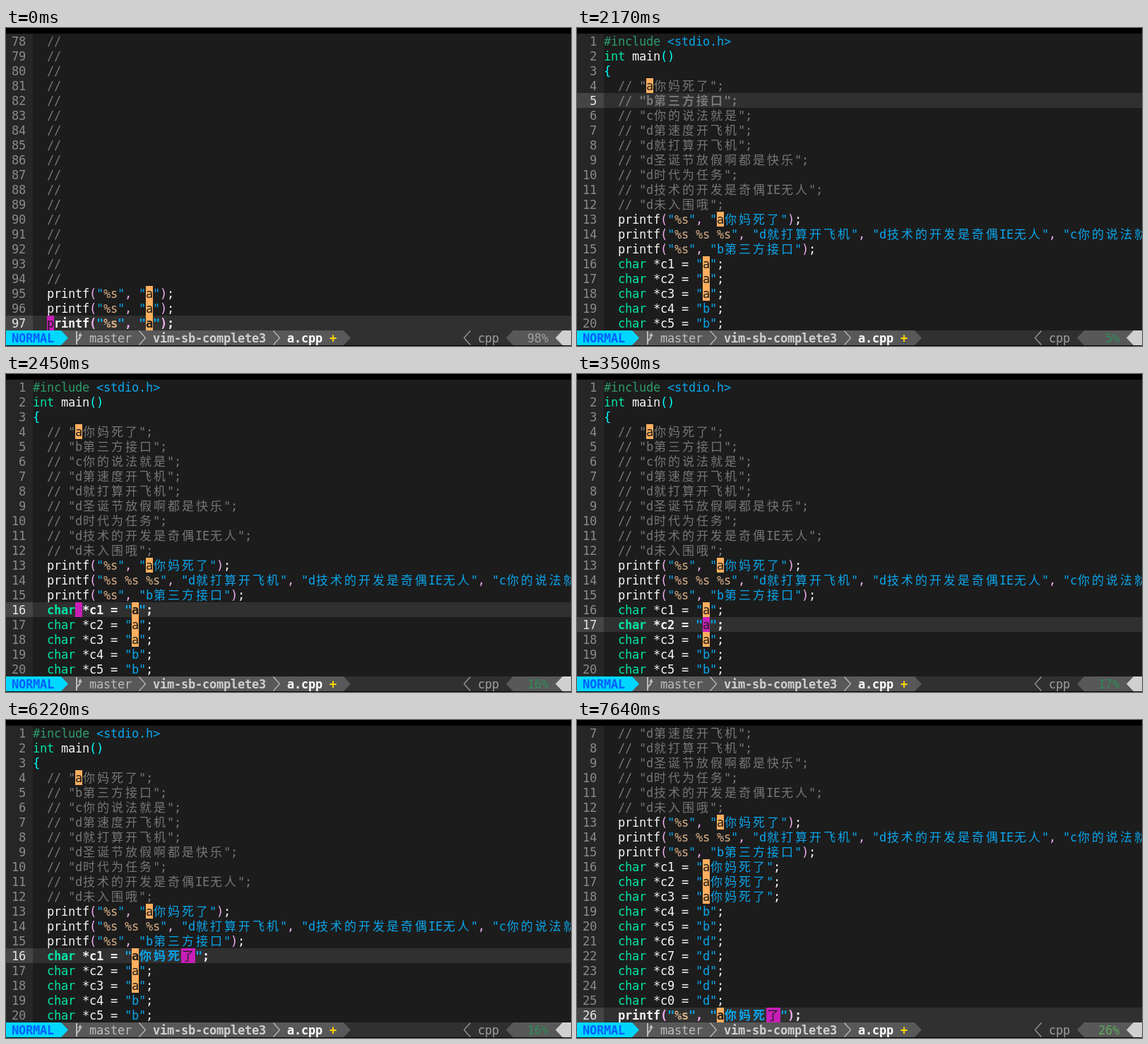
An HTML page with a canvas for the animation above (8000 ms loop, 800 px wide and 450 px high).

```html
<!DOCTYPE html>
<html lang="en">
<head>
<meta charset="utf-8">
<title>Editor session</title>
<style>
html, body { margin: 0; width: 100%; height: 100%; overflow: hidden; background: #000; }
canvas { display: block; }
</style>
</head>
<body>
<canvas id="stage" width="800" height="450"></canvas>
<script>
const ctx = document.getElementById('stage').getContext('2d');
const LOOP = 8000, ROWS = 20, TOTAL = 98, CW = 10, RH = 21, TOP = 8, LEFT = 38, BASE = 17;
const STATUS_Y = TOP + ROWS * RH;
const MONO = '17px "DejaVu Sans Mono", monospace';
const CJK = '17px "Noto Sans CJK SC", "Noto Sans CJK", sans-serif';

const C = {
  bg: '#1c1c1c', gutter: '#262626', number: '#8a8a8a', line: '#303030', lineNo: '#444444',
  text: '#f4f4f4', comment: '#767676', string: '#0aa5ea', format: '#d7af87', paren: '#f0b0f0',
  outer: '#00ffff', type: '#00e5a5', include: '#2e9b6b', match: '#ffaf5f', cursor: '#c71fb7'
};

const MODES = {
  NORMAL: { fg: '#005fff', bg: '#00d7ff', mid: '#585858', bar: '#303030', end: '#d0d0d0', type: '#9e9e9e' },
  INSERT: { fg: '#005f5f', bg: '#ffffff', mid: '#0087af', bar: '#005f87', end: '#87d7ff', type: '#87d7ff' }
};

// ---- Buffer ----
const WORD = 'a你妈死了';
const head = ['#include <stdio.h>', 'int main()', '{'];
const notes = [WORD, 'b第三方接口', 'c你的说法就是', 'd第速度开飞机', 'd就打算开飞机',
  'd圣诞节放假啊都是快乐', 'd时代为任务', 'd技术的开发是奇偶IE无人', 'd未入围哦'];
const print = s => `  printf("%s", "${s}");`;

function lineText(n, edits) {
  const word = edits[n] ?? 'a';
  if (n <= 3) return head[n - 1];
  if (n <= 12) return `  // "${notes[n - 4]}";`;
  if (n === 13) return print(WORD);
  if (n === 14) return `  printf("%s %s %s", "${notes[4]}", "${notes[7]}", "${notes[2]}");`;
  if (n === 15) return print(notes[1]);
  if (n <= 25) return `  char *c${(n - 15) % 10} = "${n <= 18 ? word : n <= 20 ? 'b' : 'd'}";`;
  if (n === 26 || (n >= 95 && n <= 97)) return print(word);
  return n === TOTAL ? '}' : '  //';
}

// Split a line into [text, colour] pieces.
function tokens(s) {
  if (s.startsWith('  //')) return [[s, C.comment]];
  if (s[0] === '#') return [['#include ', C.include], [s.slice(9), C.string]];
  const parens = s.startsWith('int') ? C.outer : C.paren;
  const out = [];
  for (const t of s.match(/"|%s|\b(?:char|int)\b|[(),{}]|[^"%(),{}\s]+|\s+/g)) {
    const quoted = out.filter(p => p[0] === '"').length % 2 === 1;
    let color = C.text;
    if (t === '%s') color = C.format;
    else if (t === '"' || quoted) color = C.string;
    else if (/^(char|int)$/.test(t)) color = C.type;
    else if (/[{}]/.test(t)) color = C.outer;
    else if (/^[(),]$/.test(t)) color = parens;
    out.push([t, color]);
  }
  return out;
}

// ---- Timeline: changes are merged into the running state ----
const steps = [
  [0, { top: 78, row: 97, x: 2, mode: 'NORMAL', edits: {}, menu: false }],
  [380, { row: 96, x: null }], [430, { x: 16 }],
  [910, { row: 97 }],
  [1200, { top: 1, row: 4, x: null }], [1250, { x: 6 }],
  [1680, { row: 5, x: null }], [1720, { x: 6 }],
  [2170, { x: null }]
];
for (let k = 1; k <= 8; k++) steps.push([2170 + 40 * k, { row: 5 + Math.round(1.6 * k), x: 6 }]);
steps.push(
  [3000, { row: 17, x: null }], [3050, { x: 6 }], [3500, { x: 14 }],
  [4020, { row: 16, x: null }], [4070, { x: 14 }],
  [4950, { x: null }],
  [4990, { x: 14, mode: 'INSERT', edits: { 16: '' } }],
  [5200, { x: 15, edits: {} }],
  [5640, { x: null, edits: { 16: WORD }, menu: true }], [5690, { x: 23 }],
  [6120, { x: null, menu: false }], [6170, { mode: 'NORMAL' }], [6220, { x: 21 }],
  [6940, { row: 17, x: 14 }], [7030, { x: 21, edits: { 16: WORD, 17: WORD } }],
  [7120, { row: 18, x: 14 }], [7210, { x: 21, edits: { 16: WORD, 17: WORD, 18: WORD } }],
  [7530, { top: 7, row: 26, x: 16 }],
  [7640, { x: 23, edits: { 16: WORD, 17: WORD, 18: WORD, 26: WORD } }]
);

function stateAt(t) {
  const s = {};
  for (const [at, change] of steps) if (at <= t) Object.assign(s, change);
  return s;
}

// ---- Drawing ----
function box(x, y, w, h, color) {
  ctx.fillStyle = color;
  ctx.fillRect(x, y, w, h);
}

const isWide = ch => ch >= '\u2e80';

function glyph(ch, x, y, color, bold) {
  const wide = isWide(ch);
  ctx.font = (bold ? 'bold ' : '') + (wide ? CJK : MONO);
  ctx.fillStyle = color;
  ctx.fillText(ch, x + (wide ? 1 : 0), y + BASE);
}

function put(s, x, y, color, bold) {
  for (const ch of s) {
    if (ch !== ' ') glyph(ch, x, y, color, bold);
    x += isWide(ch) ? 2 * CW : CW;
  }
}

function drawLine(n, y, s) {
  const current = n === s.row;
  if (current) box(0, y, 800, RH, C.line);
  box(0, y, LEFT, RH, current ? C.lineNo : C.gutter);
  put(String(n).padStart(2), 8, y, current ? '#e4e4e4' : C.number);

  let col = 0, prev = '';
  for (const [text, color] of tokens(lineText(n, s.edits))) {
    for (const ch of text) {
      const cells = isWide(ch) ? 2 : 1, x = LEFT + col * CW;
      const hit = ch === 'a' && prev === '"';
      const under = current && s.x === col;
      if (hit || under) box(x, y, cells * CW, RH, under ? C.cursor : C.match);
      if (ch !== ' ') glyph(ch, x, y, hit || under ? C.bg : color, current && !under);
      col += cells;
      prev = ch;
    }
  }
}

// Filled separator; dir 1 points right, -1 points left.
function wedge(x, dir, color) {
  const base = dir > 0 ? x : x + CW, tip = dir > 0 ? x + CW : x;
  ctx.fillStyle = color;
  ctx.beginPath();
  ctx.moveTo(base, STATUS_Y);
  ctx.lineTo(tip, STATUS_Y + RH / 2);
  ctx.lineTo(base, STATUS_Y + RH);
  ctx.fill();
}

function chevron(x, dir, color) {
  const base = dir > 0 ? x + .5 : x + CW - .5, tip = dir > 0 ? x + CW - .5 : x + .5;
  ctx.strokeStyle = color;
  ctx.lineWidth = 1.2;
  ctx.beginPath();
  ctx.moveTo(base, STATUS_Y + .5);
  ctx.lineTo(tip, STATUS_Y + RH / 2);
  ctx.lineTo(base, STATUS_Y + RH - .5);
  ctx.stroke();
}

function branch(x, y, color) {
  ctx.strokeStyle = ctx.fillStyle = color;
  ctx.lineWidth = 2;
  ctx.beginPath();
  ctx.moveTo(x + 2, y + 1);
  ctx.lineTo(x + 2, y + 20);
  ctx.moveTo(x + 2, y + 17);
  ctx.bezierCurveTo(x + 2, y + 12, x + 7, y + 14, x + 7, y + 7);
  ctx.stroke();
  ctx.beginPath();
  ctx.moveTo(x + 4, y + 8);
  ctx.lineTo(x + 7, y + 3);
  ctx.lineTo(x + 10, y + 8);
  ctx.fill();
}

function drawStatus(s) {
  const m = MODES[s.mode], y = STATUS_Y;
  box(0, y, 800, RH, m.bar);
  box(0, y, 478, RH, m.mid);
  wedge(478, 1, m.mid);
  box(0, y, 78, RH, m.bg);
  wedge(78, 1, m.bg);
  put(s.mode, 8, y, m.fg, true);
  branch(98, y, '#bcbcbc');
  put('master', 118, y, '#bcbcbc');
  chevron(188, 1, '#bcbcbc');
  put('vim-sb-complete3', 208, y, '#d0d0d0', true);
  chevron(378, 1, '#bcbcbc');
  put('a.cpp', 398, y, '#ffffff', true);
  put('+', 458, y, '#ffd700', true);

  chevron(648, -1, m.type);
  put('cpp', 668, y, m.type);
  box(718, y, 60, RH, m.mid);
  wedge(708, -1, m.mid);
  box(778, y, 10, RH, m.mid);
  const pct = Math.floor(s.row * 100 / TOTAL);
  const pctColor = pct < 20 ? '#2e8b57' : pct < 50 ? '#5fa85f' : '#9e9e9e';
  put(`${pct}%`.padStart(4), 728, y, pctColor);
  box(788, y, 12, RH, m.end);
  wedge(778, -1, m.end);
}

function drawMenu(y) {
  [WORD, 'a'].forEach((word, i) => {
    box(168, y + i * RH, 16 * CW, RH, i ? '#444444' : '#585858');
    put(word, 178, y + i * RH, '#e4e4e4');
  });
}

function draw(s) {
  box(0, 0, 800, 450, '#000000');
  box(0, TOP, 800, ROWS * RH, C.bg);
  for (let i = 0; i < ROWS; i++) drawLine(s.top + i, TOP + i * RH, s);
  if (s.menu) drawMenu(TOP + (s.row - s.top + 1) * RH);
  drawStatus(s);
}

const start = performance.now();
function tick() {
  draw(stateAt((performance.now() - start) % LOOP));
  requestAnimationFrame(tick);
}
tick();
</script>
</body>
</html>
```
